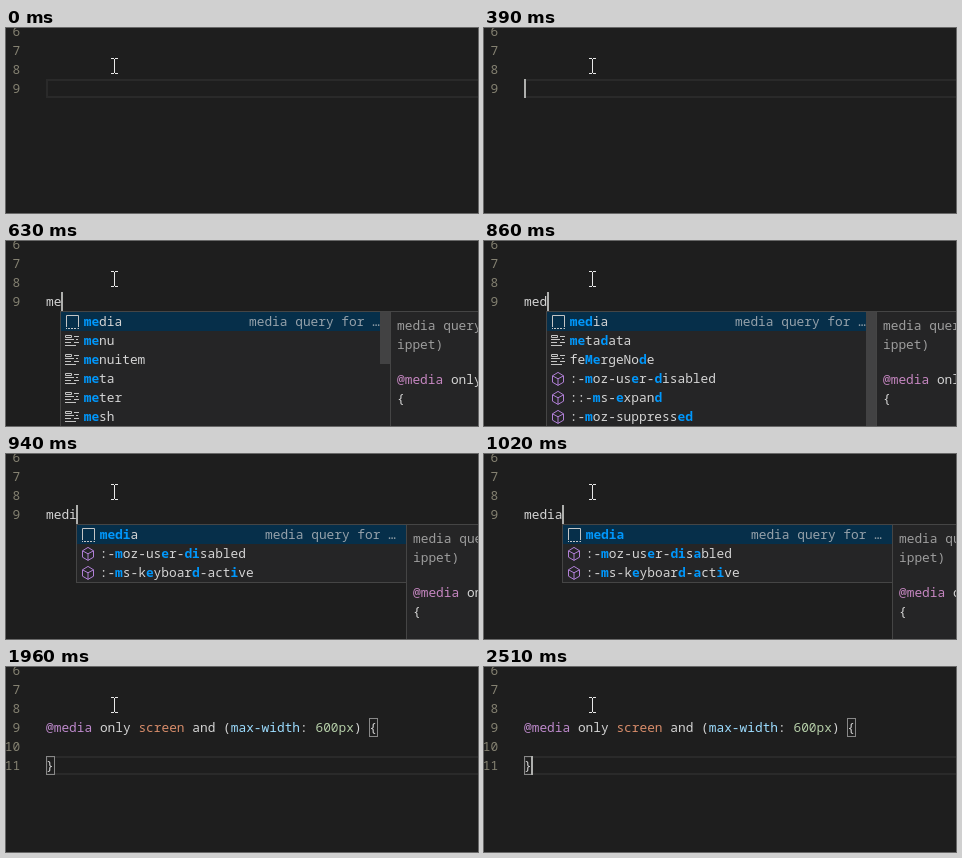
Animation of 472x185 px, one loop 3.06 s. Source, as an HTML page with a canvas:

```html
<!DOCTYPE html>
<html lang="en">
<head>
<meta charset="utf-8">
<style>
  html, body { margin: 0; width: 100%; height: 100%; overflow: hidden; background: #1e1e1e; }
  canvas { display: block; }
</style>
</head>
<body>
<canvas id="stage" width="472" height="185"></canvas>
<script>
const ctx = document.getElementById('stage').getContext('2d', { alpha: false });
const LOOP = 3060, CHAR = 7.698, LINE = 19, LEFT = 40;
const FONT = '12.83px "Noto Sans Mono", monospace';
const PLAIN = '#d4d4d4', MATCH = '#0097fb', DIM = '#9d9d9d';

// Suggestions per typed prefix: icon, label with *matched* letters
const popups = {
  me: { thumb: 52, items: [['snippet', '*me*dia'], ['keyword', '*me*nu'], ['keyword', '*me*nuitem'],
    ['keyword', '*me*ta'], ['keyword', '*me*ter'], ['keyword', '*me*sh']] },
  med: { thumb: 114, items: [['snippet', '*med*ia'], ['keyword', '*me*ta*d*ata'], ['keyword', 'fe*Me*rgeNo*d*e'],
    ['method', ':-*m*oz-us*e*r-*d*isabled'], ['method', '::-*m*s-*e*xpan*d*'], ['method', ':-*m*oz-suppress*ed*']] },
  medi: { thumb: 0, items: [['snippet', '*medi*a'], ['method', ':-*m*oz-us*e*r-*di*sabled'],
    ['method', ':-*m*s-k*e*yboar*d*-act*i*ve']] },
  media: { thumb: 0, items: [['snippet', '*media*'], ['method', ':-*m*oz-us*e*r-*di*s*a*bled'],
    ['method', ':-*m*s-k*e*yboar*d*-*a*ct*i*ve']] }
};

const icons = {
  snippet: ['#c5c5c5', 'M2.5 13V1.5H14.5V13M2 14.5h1M4 14.5h2M7 14.5h2M10 14.5h2M13.5 14.5h1.5'],
  keyword: ['#c5c5c5', 'M1.5 2.5h6v2h-6zM10 3.5h5M1 6.5h9M12 6.5h2M1 9.5h6M10 9.5h5M1 12.5h11'],
  method: ['#b180d7', 'M8 1.4L13.5 4.8V11.2L8 14.4L2.5 11.2V4.8zM2.5 4.8L8 7.8L13.5 4.8M8 7.8V14.4']
};

function rect(x, y, w, h, color) {
  ctx.fillStyle = color;
  ctx.fillRect(x, y, w, h);
}

function frame(x, y, w, h, color) {
  ctx.strokeStyle = color;
  ctx.lineWidth = 1;
  ctx.strokeRect(x + .5, y + .5, w - 1, h - 1);
}

function write(text, x, y, color = PLAIN, weight = '') {
  ctx.font = weight + ' ' + FONT;
  ctx.fillStyle = color;
  ctx.fillText(text, x, y);
  return x + text.length * CHAR;
}

const lineTop = n => 51 + (n - 9) * LINE;

function lineNumber(n) {
  write(String(n), 14.1 - String(n).length * CHAR, lineTop(n) + 14, '#858272');
}

function highlightLine(n) {
  ctx.strokeStyle = '#2a2a2a';
  ctx.lineWidth = 2;
  ctx.strokeRect(LEFT + 1, lineTop(n) + 1, 500, 17);
}

function caret(n, column) {
  rect(Math.floor(LEFT + column * CHAR), lineTop(n), 2, LINE, '#aeafad');
}

function pointer() {
  rect(108, 31, 1, 14, '#e8e8e8');
  for (const y of [30, 45]) {
    rect(105, y, 3, 1, '#e8e8e8');
    rect(109, y, 3, 1, '#e8e8e8');
  }
}

function icon(name, x, y) {
  const [color, path] = icons[name];
  ctx.save();
  ctx.translate(x, y);
  ctx.strokeStyle = color;
  ctx.lineWidth = 1;
  ctx.stroke(new Path2D(path));
  ctx.restore();
}

function popup(typed) {
  const { items, thumb } = popups[typed];
  const x = Math.round(39.1 + typed.length * CHAR), docs = x + 330;
  const height = items.length * LINE + 2;

  rect(x, 70, 331, height, '#252526');
  rect(x + 1, 71, 329, LINE, '#062f4a');
  items.forEach(([kind, label], row) => {
    const y = 71 + row * LINE;
    icon(kind, x + 4, y + 2);
    let pen = x + 23.7;
    label.split('*').forEach((part, i) => {
      pen = i % 2 ? write(part, pen, y + 14, MATCH, 'bold') : write(part, pen, y + 14);
    });
  });
  write('media query for …', x + 189, 85, '#95a1aa');
  if (thumb) rect(x + 320, 71, 10, thumb, '#424243');
  // A full list runs below the visible area
  frame(x, 70, 331, items.length > 5 ? 230 : height, '#454545');

  rect(docs, 70, 200, 200, '#252526');
  frame(docs, 70, 200, 200, '#454545');
  write('media query', docs + 7, 89, DIM);
  write('ippet)', docs + 7, 108, DIM);
  write(' only', write('@media', docs + 7, 143, '#c586c0'), 143);
  write('{', docs + 7, 162);
}

function typing(typed, caretOn) {
  const y = lineTop(9) + 14;
  if (typed.length < 2) highlightLine(9);
  if (typed === 'm') {
    write(typed, LEFT - .7, y, '#3f9fd0');
    write(typed, LEFT + .7, y, '#c98a55');
  }
  write(typed, LEFT, y);
  if (caretOn) caret(9, typed.length);
  if (popups[typed]) popup(typed);
}

function expanded(brackets, caretOn) {
  lineNumber(10);
  lineNumber(11);
  highlightLine(11);
  const parts = [['@media', '#bd89cb'], [' only '], ['screen', '#d78c6a'], [' and ('],
    ['max-width', '#9cdcfe'], [': '], ['600px', '#b5cea8'], [') {']];
  let pen = LEFT;
  for (const [text, color] of parts) pen = write(text, pen, 65, color);
  write('}', LEFT, 103);
  if (brackets) {
    frame(Math.floor(pen - CHAR), 51, 9, LINE, '#888888');
    frame(LEFT, 89, 9, LINE, '#888888');
  }
  if (caretOn) caret(11, 1);
}

function draw(t) {
  rect(0, 0, 472, 185, '#1e1e1e');
  for (let n = 6; n <= 9; n++) lineNumber(n);
  if (t < 550) typing('', t >= 390);
  else if (t < 1490) {
    const count = [550, 630, 860, 940, 1020].filter(key => t >= key).length;
    typing('media'.slice(0, count), true);
  } else expanded(t >= 1570, t < 1960 || t >= 2510);
  pointer();
}

const start = performance.now();
function tick() {
  draw((performance.now() - start) % LOOP);
  requestAnimationFrame(tick);
}
tick();
</script>
</body>
</html>
```
